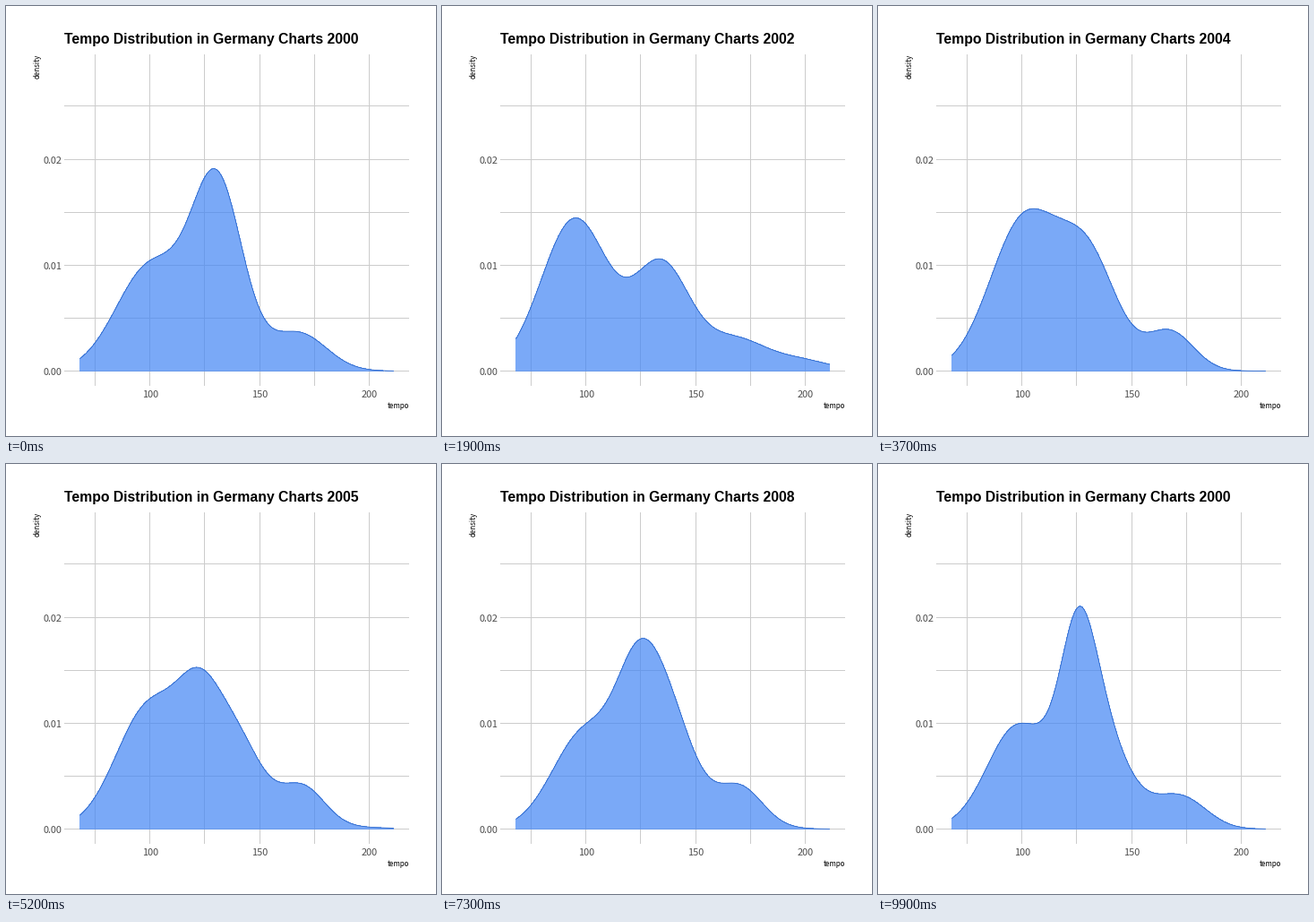
A matplotlib script for the animation above (10000 ms loop, 480 px wide and 480 px high).

```python
import numpy as np
import matplotlib.pyplot as plt
from matplotlib.animation import FuncAnimation

SIZE, DPI = 480, 80
PT = 72 / DPI
FRAMES, INTERVAL = 100, 100
FLOOR = 407.5
FIRST_YEAR, YEARS = 2000, 11
HOLD = 5

# Each density is a sum of bell curves: (tempo, height in 1e-4, spread)
BELLS = {
    2000: [(100.3, 99, 15.6), (130.7, 174, 11.6), (167.5, 36, 12.9)],
    2001: [(95.7, 139, 14.9), (133.9, 127, 12.1), (168, 30, 12.1), (200, 4.5, 9)],
    2003: [(94.3, 148, 15.5), (136, 66, 14.3), (175, 30, 25)],
    2004: [(101, 141, 15.5), (130.3, 102, 13.3), (167.5, 37, 10.7)],
    2007: [(99, 84, 13.9), (121.8, 137, 9.6), (141.8, 100, 11.1), (170.7, 45, 9.7)],
    2009: [(92.5, 76, 13.9), (128.2, 219, 10.5), (152.5, 42, 9.3),
           (177, 21, 9.3), (209, 6, 7)],
    2010: [(94.6, 97, 11), (125.1, 281, 7.25), (149, 44, 7.9), (177.5, 32, 10)],
}
# Years that lie between others
BLENDS = {2002: (2001, 2003), 2005: (2004, 2007),
          2006: (2003, 2004, 2007), 2008: (2000, 2007)}


def to_x(tempo):
    return 160.6 + 2.448 * (tempo - 100)


def to_y(density):
    return FLOOR - 11840 * density


def density(year, tempo):
    if year in BLENDS:
        return np.mean([density(part, tempo) for part in BLENDS[year]], axis=0)
    return sum(1e-4 * height * np.exp(-((tempo - centre) / spread) ** 2 / 2)
               for centre, height, spread in BELLS[year])


TEMPOS = np.linspace(68.2, 211, 351)
XS = to_x(TEMPOS)
CURVES = [to_y(density(FIRST_YEAR + k, TEMPOS)) for k in range(YEARS)]

fig = plt.figure(figsize=(SIZE / DPI, SIZE / DPI), dpi=DPI, facecolor="white")
ax = fig.add_axes([0, 0, 1, 1])
ax.set_xlim(0, SIZE)
ax.set_ylim(SIZE, 0)
ax.axis("off")


def label(x, y, text, px, color="black", family="Noto Sans CJK JP", **kwargs):
    return ax.text(x, y, text, fontsize=px * PT, color=color, family=family,
                   va="baseline", rotation_mode="anchor", **kwargs)


def grid_line(xs, ys):
    ax.plot(xs, ys, color="#cccccc", lw=PT, snap=False,
            solid_capstyle="butt", zorder=1)


def pixel_centre(value):
    return np.floor(value) + 0.5


for i in range(6):
    x = pixel_centre(to_x(75 + 25 * i))
    y = pixel_centre(to_y(0.005 * i) + 0.4)
    grid_line([x, x], [54, 424])
    grid_line([65, 450], [y, y])

for tempo in (100, 150, 200):
    label(to_x(tempo), 437, str(tempo), 10.9, "#4d4d4d", ha="center")
for value in (0, 0.01, 0.02):
    label(62.5, to_y(value) + 5, f"{value:.2f}", 10.9, "#4d4d4d", ha="right")
label(450, 449, "tempo", 8, ha="right")
label(37.5, 54, "density", 8, rotation=90, ha="right")

title = label(65, 42, "", 15.75, family="Liberation Sans", weight="bold")
area, = ax.fill([0, 1, 1], [0, 0, 1], color="#4285f4", alpha=0.7, lw=0,
                antialiased=False, zorder=2)
outline, = ax.plot([], [], color="#2a65c8", lw=0.8 * PT, zorder=3)


def step_count(k):
    """Frames spent changing from year k to the next."""
    return 5 if k < 2 else 4


def state_at(frame):
    """Index of the year shown, index of the next one, and progress."""
    k = 0
    while frame >= HOLD + step_count(k):
        frame -= HOLD + step_count(k)
        k += 1
    # The arriving step of each change is the first frame of the next hold
    progress = max(0, frame - HOLD + 1) / step_count(k)
    return k, (k + 1) % YEARS, progress


def update(frame):
    old, new, t = state_at(frame)
    ys = (1 - t) * CURVES[old] + t * CURVES[new]
    bottom = FLOOR - 0.4
    area.set_xy(np.column_stack([np.r_[XS, XS[-1], XS[0]],
                                 np.r_[ys, bottom, bottom]]))
    outline.set_data(XS, ys)
    year = FIRST_YEAR + (new if t > 0.5 else old)
    title.set_text(f"Tempo Distribution in Germany Charts {year}")
    return area, outline, title


animation = FuncAnimation(fig, update, frames=FRAMES, interval=INTERVAL,
                          repeat=True, repeat_delay=0)
plt.show()
```
